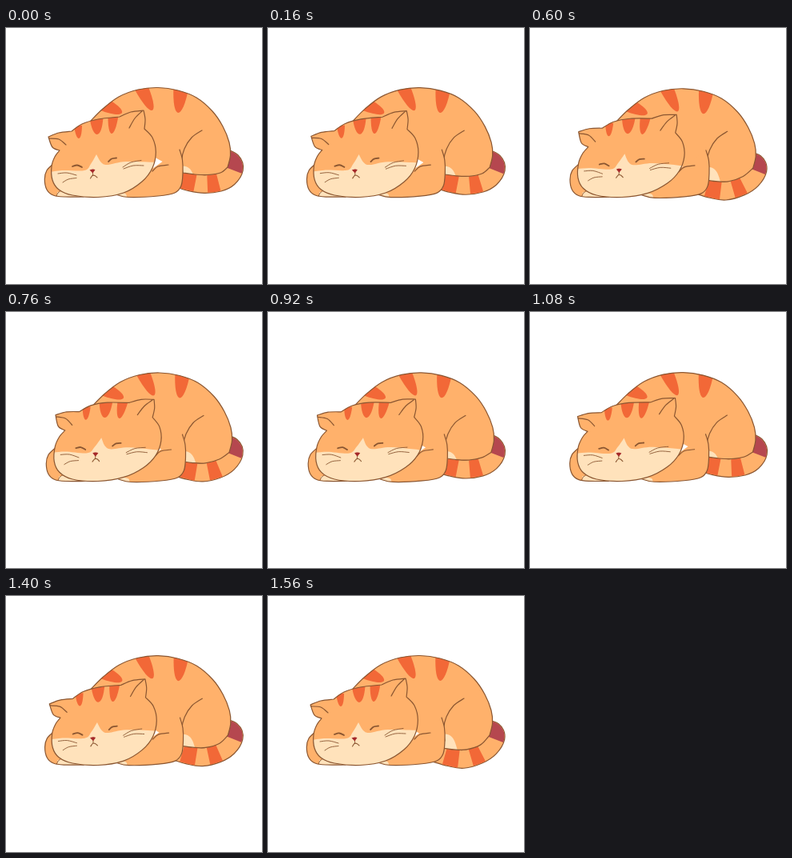
Write an HTML page with a canvas that moves like this. It is 320 by 320 pixels and loops after 1.6 s.

```html
<!DOCTYPE html>
<html>
<head>
<meta charset="utf-8">
<title>Sleeping cat</title>
<style>
html, body { margin: 0; width: 100%; height: 100%; overflow: hidden; background: #fff; }
canvas { display: block; width: 320px; height: 320px; }
</style>
</head>
<body>
<canvas width="320" height="320"></canvas>
<script>
const ctx = document.querySelector('canvas').getContext('2d');
const LOOP = 1600, STEP = 40;
const ORANGE = '#ffb16b', STRIPE = '#f26837', CREAM = '#ffe2bb', LINE = '#8a5631', TIP = '#b5474f', NOSE = '#a5292a';

// 0..1..0 progress of the breathing and of the tail, set for each picture.
let breath = 0, wag = 0;

const shift = (dx, dy) => ([x, y]) => [x + dx * breath, y + dy * breath];

// The head rolls around the chin, more strongly towards the ears.
function roll([x, y]) {
  const height = Math.max(0, 208 - y), turn = 0.125 * breath;
  return [x + turn * height, y + turn * (x - 122) * Math.sqrt(height / 100)];
}

// The tail sinks away from its tip.
function sink([x, y]) {
  const reach = wag * Math.min(1, Math.max(0, (290 - x) / 40));
  return [x - 4 * reach, y + 9 * reach];
}

// The belly rests on the tail.
const settle = p => p[1] > 178 ? sink(p) : shift(2, 1.5)(p);

// Smooth curve through "x,y" points; ';' separates runs that meet at corners.
function curve(points, warp) {
  const path = new Path2D();
  points.split(';').forEach((run, n) => {
    const pts = run.trim().split(' ').map(p => warp(p.split(',').map(Number)));
    n ? path.lineTo(...pts[0]) : path.moveTo(...pts[0]);
    for (let i = 0; i < pts.length - 1; i++) {
      const a = pts[i], b = pts[i + 1], before = pts[i - 1] || a, after = pts[i + 2] || b;
      path.bezierCurveTo(
        a[0] + (b[0] - before[0]) / 6, a[1] + (b[1] - before[1]) / 6,
        b[0] - (after[0] - a[0]) / 6, b[1] - (after[1] - a[1]) / 6, ...b);
    }
  });
  return path;
}

// Rounded fur stripe from the base (x, y) along (dx, dy).
function stripe(x, y, dx, dy, width, warp) {
  const half = width / 2 / Math.hypot(dx, dy);
  const at = (along, side) => warp([x + dx * along - dy * half * side, y + dy * along + dx * half * side]);
  const path = new Path2D();
  path.moveTo(...at(0, 1));
  path.bezierCurveTo(...at(1.33, 0.7), ...at(1.33, -0.7), ...at(0, -1));
  return path;
}

function fill(path, color) {
  ctx.fillStyle = color;
  ctx.fill(path);
}

function stroke(path, width = 1.2, color = LINE, dash = [], offset = 0) {
  ctx.lineWidth = width;
  ctx.strokeStyle = color;
  ctx.setLineDash(dash);
  ctx.lineDashOffset = -offset;
  ctx.stroke(path);
}

// Outlined shape with a cream patch and stripes clipped to it.
function part(outline, cream, stripes = []) {
  fill(outline, ORANGE);
  ctx.save();
  ctx.clip(outline);
  fill(cream, CREAM);
  stripes.forEach(s => fill(s, STRIPE));
  ctx.restore();
  stroke(outline);
}

function drawTail() {
  const spine = curve('272,162 282,167 285,176 278,187 266,193 248,195 231,192.5 212,187', sink);
  ctx.lineCap = 'butt';
  stroke(spine, 24, LINE);
  stroke(spine, 21.6, ORANGE);
  stroke(spine, 21.6, TIP, [23, 200]);
  stroke(spine, 21.6, STRIPE, [14, 15.5, 18, 99], 48);
  ctx.lineCap = 'round';
}

function drawBody() {
  const move = shift(2, 1.5);
  part(
    curve('105,117 121,101 141,86 165,77 190,74.5 215,78 238,87 258,104 271,123 279,143 280.5,159 277,174; 277,174 268,181 252,183.5 236,183 221,181', settle),
    curve('217,172 227,174 233,181 238,197; 238,197 217,197', move),
    [stripe(121, 95, 24, 11, 17, move), stripe(169, 74, 14, 29, 17, move), stripe(219, 73, -4, 33, 19, move)]);
  stroke(curve('245,128 232,137 223,151 219.5,166 221,181', move));
}

function drawFront() {
  const move = shift(3.5, 1), nudge = shift(2, 0.5);
  part(curve('217,152 220.5,165 221,181 219,197 211,206 190,210 153,211.5 137,208', move),
       curve('134,205 149,207 151,214; 151,214 134,214', move));
  stroke(curve('183,179 190,173 203,171', move));
  part(curve('60,169 51,178 48.3,189 51,202 59,209 72,211 97,211', nudge),
       curve('64,205 75,204 97,208; 97,208 97,214; 97,214 64,214', nudge));
  stroke(curve('69,203 65,206 63,210', nudge), 0.9);
}

function drawHead() {
  part(
    curve('173,126 183,137 187.3,155 183,175 170,192 147,206 115,211.5 83,209 66,202 58,190 57,173 61,161 67,153; 67,153 58,149 53,136; 53,136 66,131 82,129; 82,129 95,120 115,114 142,111; 142,111 156,105 172,103; 172,103 174,114 173,126', roll),
    curve('50,181 70,178 98,178 106,170 113,158; 113,158 119,168 127,171 150,167 192,168; 192,168 190,216; 190,216 50,216', roll),
    [stripe(90, 122, 1, 16, 10, roll), stripe(113, 111, 1, 22, 17, roll), stripe(134, 109, -2, 23, 13, roll)]);
  stroke(curve('54,138 66,139 75,146', roll));
  stroke(curve('170,104 161,113 154,125', roll));
}

function drawFace() {
  const line = (points, width) => stroke(curve(points, roll), width);
  line('83,173 89,171.5 95,174', 1.8);
  line('128,167 132,163.5 138,162.5', 1.8);
  line('108.5,181 108.5,184', 1);
  line('105.5,188 108,184.5 111,184.5 114,187', 1.1);
  ['65,182 76,181 88,184', '71,193 78,189 88,187.5', '146,174 156,168 169,165.5', '147,176 159,172 172,172']
    .forEach(whisker => line(whisker, 0.9));
  fill(curve('104.5,177.5 108,176.5 111.5,177; 111.5,177 108.5,181.5', roll), NOSE);
}

function render(t) {
  const wave = cycles => (1 - Math.cos(2 * Math.PI * cycles * t / LOOP)) / 2;
  breath = wave(1);
  wag = wave(1.5);
  ctx.fillStyle = '#fff';
  ctx.fillRect(0, 0, 320, 320);
  ctx.lineCap = ctx.lineJoin = 'round';
  drawTail();
  drawBody();
  drawFront();
  drawHead();
  drawFace();
}

const start = performance.now();
function tick() {
  const t = (performance.now() - start) % LOOP;
  render(Math.floor(t / STEP) * STEP);
  requestAnimationFrame(tick);
}
tick();
</script>
</body>
</html>
```
